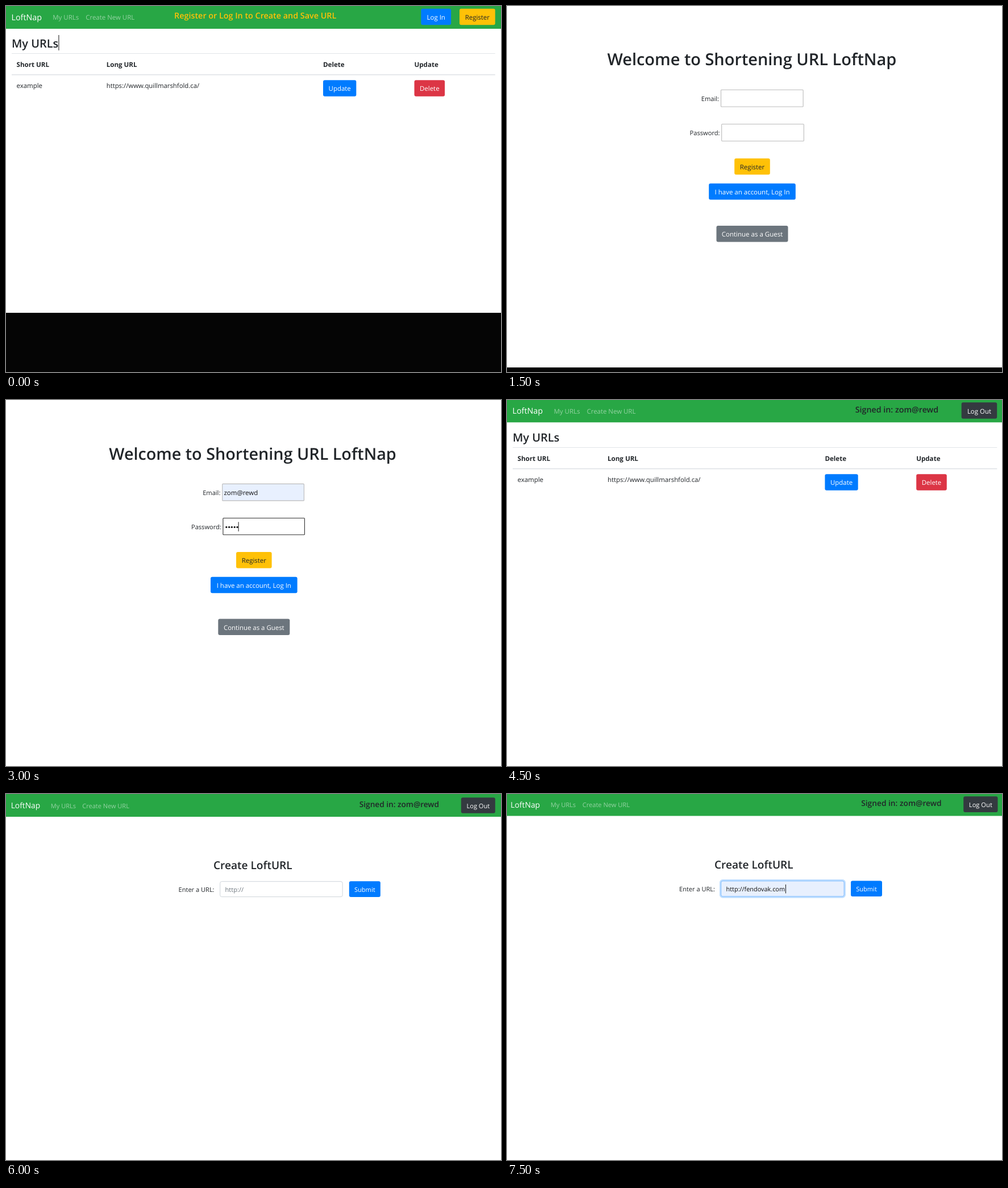
Recreate the animation shown at these times as an HTML page. Size 871 by 643 pixels, loop 8000 ms.

```html
<!DOCTYPE html>
<html lang="en">
<head>
<meta charset="utf-8">
<title>Short links</title>
<style>
  html, body { margin: 0; width: 100%; height: 100%; overflow: hidden; background: #fff; }
  svg { display: block; width: 871px; height: 643px; }
  text { font-family: "Open Sans", "Noto Sans", sans-serif; text-rendering: geometricPrecision; white-space: pre; }
</style>
</head>
<body>
<svg id="stage" viewBox="0 0 871 643"></svg>
<script>
const LOOP = 8000, STEP = 1500;
const GREEN = '#28a745', BLUE = '#007bff', YELLOW = '#ffc107', RED = '#dc3545';
const GREY = '#6c757d', DARK = '#343a40', INK = '#212529', FILLED = '#e8f0fe', BLACK = '#050505';
const BODY = 11.45;

const APP = 'LoftNap', USER = 'zom@rewd';
const link = (scheme, rest) => `${scheme}://${rest}`;

const rect = (x, y, w, h, fill, extra = '') =>
  `<rect x="${x}" y="${y}" width="${w}" height="${h}" fill="${fill}" ${extra}/>`;

const text = (x, y, str, { size = BODY, fill = INK, weight = 400, anchor = 'start' } = {}) =>
  `<text x="${x}" y="${y}" font-size="${size}" fill="${fill}" font-weight="${weight}" text-anchor="${anchor}">${str}</text>`;

const button = (x, y, w, label, color, fill = '#fff', size = BODY, h = 28.5) =>
  rect(x, y, w, h, color, 'rx="3"') +
  text(x + w / 2, y + h / 2 + 5, label, { size, fill, anchor: 'middle' });

const field = (x, y, w, h, fill, stroke, line = 1.1, r = 1) =>
  rect(x, y, w, h, fill, `rx="${r}" stroke="${stroke}" stroke-width="${line}"`);

const caret = (x, y, h) => rect(x, y, 1, h, '#111');

function navbar({ h, x, links, base, size = BODY }) {
  const faded = { size, fill: 'rgba(255,255,255,.5)' };
  return rect(0, 0, 871, h, GREEN) +
    text(x, base + 0.7, APP, { size: size * 1.25, fill: '#fff' }) +
    text(links[0], base, 'My URLs', faded) +
    text(links[1], base, 'Create New URL', faded);
}

const signedIn = (x, y, size) => text(x, y, `Signed in: ${USER}`, { size, weight: 600 });

function urlTable(right, cols) {
  const head = { size: 11.6, weight: 700 };
  const [long, update, remove] = cols;
  return text(10, 72.7, 'My URLs', { size: 19.9, weight: 600 }) +
    rect(10, 83, right - 10, 0.9, '#dee2e6') +
    rect(10, 120, right - 10, 1.5, '#dee2e6') +
    text(18.5, 106.5, 'Short URL', head) +
    text(long, 106.5, 'Long URL', head) +
    text(update, 106.5, 'Delete', head) +
    text(remove, 106.5, 'Update', head) +
    text(18.5, 144.3, 'example') +
    text(long, 144.3, link('https', 'www.quillmarshfold.ca/'), { size: 11.35 }) +
    button(update, 130.2, 58.3, 'Update', BLUE) +
    button(remove, 130.2, 53.6, 'Delete', RED);
}

// The sign-up page is laid out around a centre line.
function signUp({ mid, title, titleY, size, labels, rows }) {
  const label = { size: size * 0.97 };
  return text(mid - 255, titleY, `Welcome to Shortening URL ${APP}`, { size: title, weight: 600 }) +
    text(labels[0], 167.2, 'Email:', label) +
    text(labels[1], 227.4, 'Password:', label) +
    button(mid - 31.3, rows[0], 62.6, 'Register', YELLOW, INK, size) +
    button(mid - 76.3, rows[1], 152.6, 'I have an account, Log In', BLUE, '#fff', size) +
    button(mid - 63, rows[2], 126, 'Continue as a Guest', GREY, '#fff', size);
}

function createPage({ titleY, label, base, submit, y }) {
  const size = 11.05;
  return text(365, titleY, 'Create LoftURL', { size: 19.1, weight: 600 }) +
    text(label, base, 'Enter a URL:', { size }) +
    button(submit, y, 55, 'Submit', BLUE, '#fff', size, 27.6);
}

const dots = [0, 1, 2, 3, 4]
  .map(i => `<circle cx="${387.8 + i * 4.8}" cy="223.3" r="1.6" fill="#111"/>`).join('');

const scenes = [
  navbar({ h: 40, x: 9.5, links: [82.3, 140.3], base: 23.8 }) +
    text(438.7, 21.6, 'Register or Log In to Create and Save URL',
      { size: 14.35, fill: YELLOW, weight: 600, anchor: 'middle' }) +
    button(730.3, 4.7, 52.8, 'Log In', BLUE) +
    button(798, 4.7, 62.7, 'Register', YELLOW, INK) +
    urlTable(860.7, [176.7, 558, 718.5]) +
    caret(92.4, 51, 27) +
    rect(0, 539, 871, 104, BLACK),

  signUp({ mid: 431.5, title: 28.95, titleY: 104.4, size: 11.5, labels: [341.7, 321.5], rows: [267.8, 311.8, 386] }) +
    field(376.5, 147.3, 144.6, 29.7, '#fff', '#bbb') +
    field(377.7, 207.5, 144.6, 29.7, '#fff', '#bbb') +
    rect(0, 635, 871, 8, BLACK),

  signUp({ mid: 436.3, title: 28.75, titleY: 105, size: 11.43, labels: [346.2, 326], rows: [267.1, 310.8, 384.5] })
    .replaceAll('NaN', '') +
    field(380.7, 147.4, 143.7, 29.5, FILLED, '#bbb') +
    field(381.9, 207.5, 143.5, 29.3, '#fff', '#333') +
    text(383.5, 167.2, USER, { fill: '#111' }) +
    dots + caret(408.6, 214.3, 16.5),

  navbar({ h: 39.3, x: 9.5, links: [82.5, 140.5], base: 23.6 }) +
    signedIn(612.7, 21.5, 14.25) +
    button(799.7, 4.3, 62.5, 'Log Out', DARK) +
    urlTable(862.3, [177, 559.4, 720.2]),

  navbar({ h: 40, x: 8.7, links: [78.8, 134.3], base: 24.6, size: 11 }) +
    signedIn(621.8, 22.8, 13.65) +
    button(800.8, 6.2, 60, 'Log Out', DARK, '#fff', 11.05, 27.6) +
    createPage({ titleY: 132, label: 303.6, base: 171.8, submit: 603.8, y: 153.3 }) +
    field(376.7, 153.7, 215.4, 26.9, '#fff', '#ced4da', 1, 3) +
    text(385.6, 172, link('http', ''), { size: 11.05, fill: GREY }),

  navbar({ h: 38.5, x: 6.3, links: [76.7, 132.7], base: 22.9, size: 11.1 }) +
    signedIn(623.2, 21, 13.75) +
    button(803.2, 4.3, 60.3, 'Log Out', DARK, '#fff', 11.15, 27.8) +
    createPage({ titleY: 131.1, label: 303, base: 171.1, submit: 605, y: 152.5 }) +
    field(375.4, 151.6, 219, 29.6, FILLED, '#bfdeff', 3, 4) +
    field(376.7, 152.9, 216.4, 27, FILLED, '#80bdff', 1, 3) +
    text(385.6, 171.2, link('http', 'fendovak.com'), { size: 10.9, fill: '#111' }) +
    caret(489.9, 159, 15.5)
];

const stage = document.getElementById('stage');
stage.innerHTML = scenes.map(s => `<g>${s}</g>`).join('');
const groups = [...stage.children];

function show(now) {
  const current = Math.floor((now % LOOP) / STEP);
  groups.forEach((g, i) => g.style.display = i === current ? '' : 'none');
}

function tick() {
  show(performance.now());
  requestAnimationFrame(tick);
}
tick();
</script>
</body>
</html>
```
